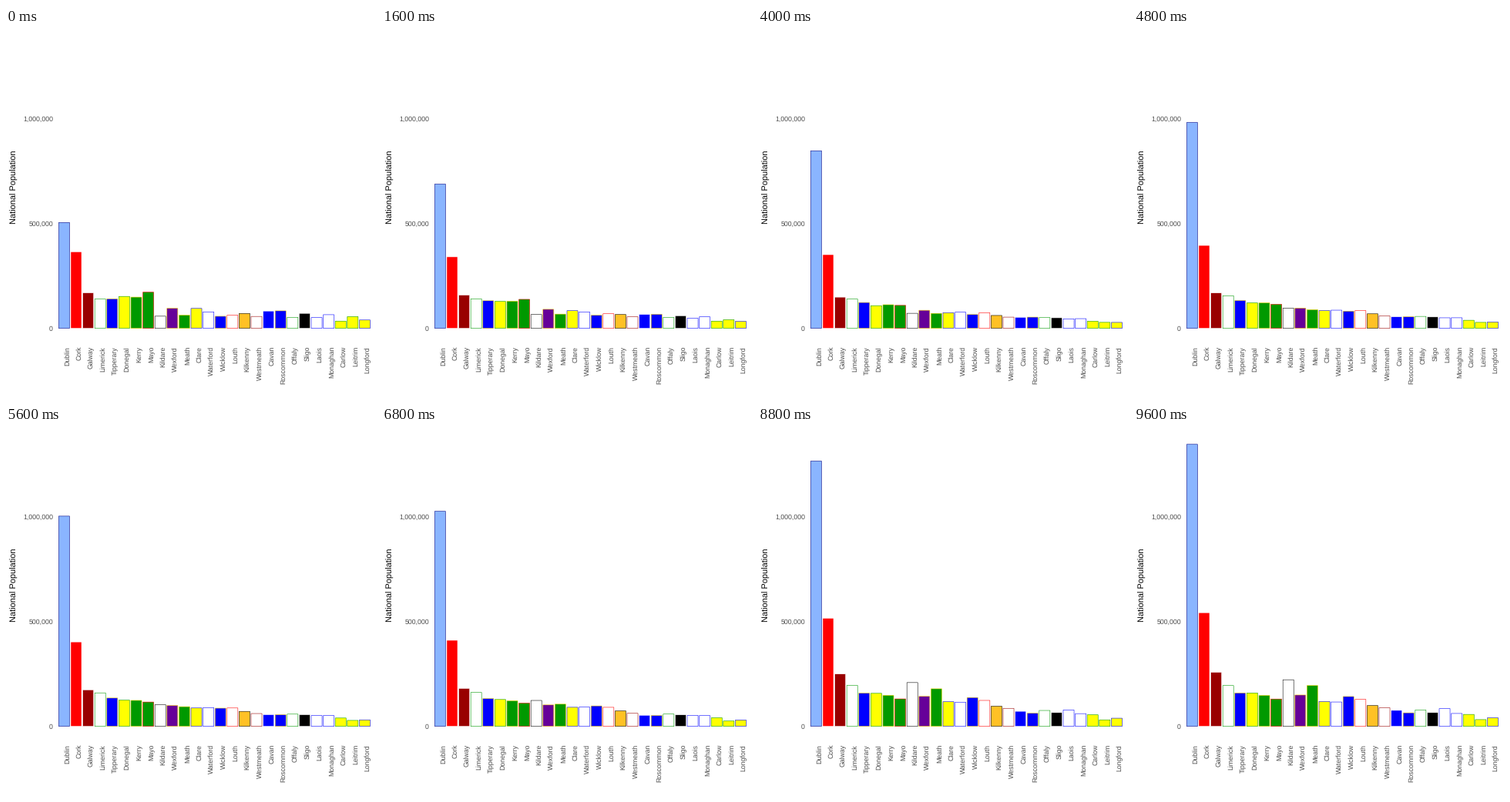
These frames come from a looping animation (480x480 px, 9800 ms). A matplotlib script:

```python
import matplotlib.pyplot as plt
import numpy as np
from matplotlib.animation import FuncAnimation
from matplotlib.patches import Rectangle

plt.rcParams["font.family"] = "Liberation Sans"
plt.rcParams["text.hinting"] = "none"

SIZE, DPI = 480, 100
PT = 72 / DPI                      # points per pixel
BASE, PER_K = 389.6, 0.2715        # zero line, pixels per thousand people
X0, PITCH, WIDTH = 75.4, 15.6, 14.04
STEPS = 3                          # frames from one census to the next

YEARS = np.array([1926, 1936, 1946, 1951, 1956, 1961, 1966, 1971, 1979,
                  1981, 1986, 1991, 1996, 2002, 2006, 2011, 2016])
KNOTS = [1926, 1971, 1991, 2002, 2016]
# Shared departure from straight lines between the knot years, in percent
TREND = np.array([0, 0, 1, 0.3, -2, -5, -3.5, 0, 4.5,
                  5.5, 4.5, 0, -3, 0, 3, 4.5, 0])

# Thousands of people, one value per census
DUBLIN = [505.7, 586.9, 636.2, 693.0, 705.8, 718.3, 795.0, 852.2, 983.7,
          1003.2, 1021.4, 1025.3, 1058.3, 1122.8, 1187.2, 1273.1, 1347.4]
CORK = [365.7, 356.0, 343.7, 341.3, 336.7, 330.4, 339.7, 352.9, 396.1,
        402.5, 412.7, 410.4, 420.5, 447.8, 481.3, 519.0, 542.9]

SKY, MAROON, GREEN, PURPLE, AMBER = (
    "#8ab5ff", "#990000", "#009900", "#660099", "#ffc125")
RED, BLUE, YELLOW, GOLD, NAVY = (
    "#ff0000", "#0000ff", "#ffff00", "#ffd700", "#000080")

# Name, fill, outline, thousands of people at the census or knot years
COUNTIES = [
    ("Dublin", SKY, NAVY, DUBLIN),
    ("Cork", RED, "white", CORK),
    ("Galway", MAROON, "white", [169.4, 149.2, 180.4, 209.1, 258.1]),
    ("Limerick", "white", GREEN, [140.3, 140.5, 162.0, 175.3, 194.9]),
    ("Tipperary", BLUE, GOLD, [141.0, 123.6, 132.8, 140.1, 159.6]),
    ("Donegal", YELLOW, GREEN, [152.5, 108.3, 128.1, 137.6, 159.2]),
    ("Kerry", GREEN, GOLD, [149.2, 112.8, 121.9, 132.5, 147.7]),
    ("Mayo", GREEN, RED, [172.7, 109.5, 110.7, 117.4, 130.5]),
    ("Kildare", "white", "black", [58.0, 72.0, 122.7, 163.9, 222.5]),
    ("Wexford", PURPLE, GOLD, [95.8, 86.4, 102.1, 116.6, 149.7]),
    ("Meath", GREEN, GOLD, [63.0, 71.7, 105.4, 134.0, 195.0]),
    ("Clare", YELLOW, BLUE, [95.1, 75.0, 90.9, 103.3, 118.8]),
    ("Waterford", "white", BLUE, [78.6, 77.3, 91.6, 101.5, 116.2]),
    ("Wicklow", BLUE, GOLD, [57.6, 66.3, 97.3, 114.7, 142.4]),
    ("Louth", "white", RED, [62.7, 75.0, 90.7, 101.8, 128.9]),
    ("Kilkenny", AMBER, "black", [71.0, 61.5, 73.6, 80.3, 99.2]),
    ("Westmeath", "white", MAROON, [56.8, 53.6, 61.9, 71.9, 88.8]),
    ("Cavan", BLUE, "white", [82.5, 52.6, 52.8, 56.5, 76.2]),
    ("Roscommon", BLUE, GOLD, [83.6, 53.5, 51.9, 53.8, 64.5]),
    ("Offaly", "white", GREEN, [52.6, 51.8, 58.5, 63.7, 78.0]),
    ("Sligo", "black", "white", [71.4, 50.3, 54.8, 58.2, 65.5]),
    ("Laois", "white", BLUE, [51.5, 45.3, 52.3, 58.8, 84.7]),
    ("Monaghan", "white", BLUE, [65.1, 46.2, 51.3, 52.6, 61.4]),
    ("Carlow", YELLOW, GREEN, [34.5, 34.2, 40.9, 46.0, 56.9]),
    ("Leitrim", YELLOW, GREEN, [55.9, 28.4, 25.3, 25.8, 32.0]),
    ("Longford", YELLOW, BLUE, [39.8, 28.3, 30.3, 31.1, 40.9]),
]


def series(values):
    """Population at every census year."""
    if len(values) == len(YEARS):
        return np.array(values)
    return np.interp(YEARS, KNOTS, values) * (1 + TREND / 100)


def ease(p):
    """Quintic ease in and out."""
    return 16 * p**5 if p < 0.5 else 1 - 16 * (1 - p)**5


fig = plt.figure(figsize=(SIZE / DPI, SIZE / DPI), dpi=DPI, facecolor="white")
ax = fig.add_axes([0, 0, 1, 1])
ax.set_xlim(0, SIZE)
ax.set_ylim(SIZE, 0)
ax.axis("off")


def label(x, y, text, size=8.8, color="#4d4d4d", ha="right", angle=0):
    ax.text(x, y, text, fontsize=size * PT, color=color, ha=ha,
            va="baseline", rotation=angle, rotation_mode="anchor")


label(13.4, 206.7, "National Population", 11, "black", "center", 90)
for thousands in (0, 500, 1000):
    label(61, BASE - thousands * PER_K + 3.1, f"{thousands * 1000:,}")

bars = []
for i, (name, fill, edge, _) in enumerate(COUNTIES):
    x = X0 + i * PITCH
    label(x + 6.4, 413, name, angle=90)
    bar = Rectangle((x - WIDTH / 2, BASE), WIDTH, 0, facecolor=fill,
                    edgecolor=edge, linewidth=0.55 * PT, joinstyle="miter",
                    snap=False)
    bars.append(ax.add_patch(bar))

people = np.array([series(row[3]) for row in COUNTIES])


def draw(frame):
    k, step = divmod(frame, STEPS)
    after = min(k + 1, len(YEARS) - 1)
    now = people[:, k] + (people[:, after] - people[:, k]) * ease(step / STEPS)
    for bar, value in zip(bars, now):
        bar.set_height(-value * PER_K)
    return bars


anim = FuncAnimation(fig, draw, frames=STEPS * (len(YEARS) - 1) + 1,
                     interval=200, repeat=True, repeat_delay=0, blit=False)
plt.show()
```
